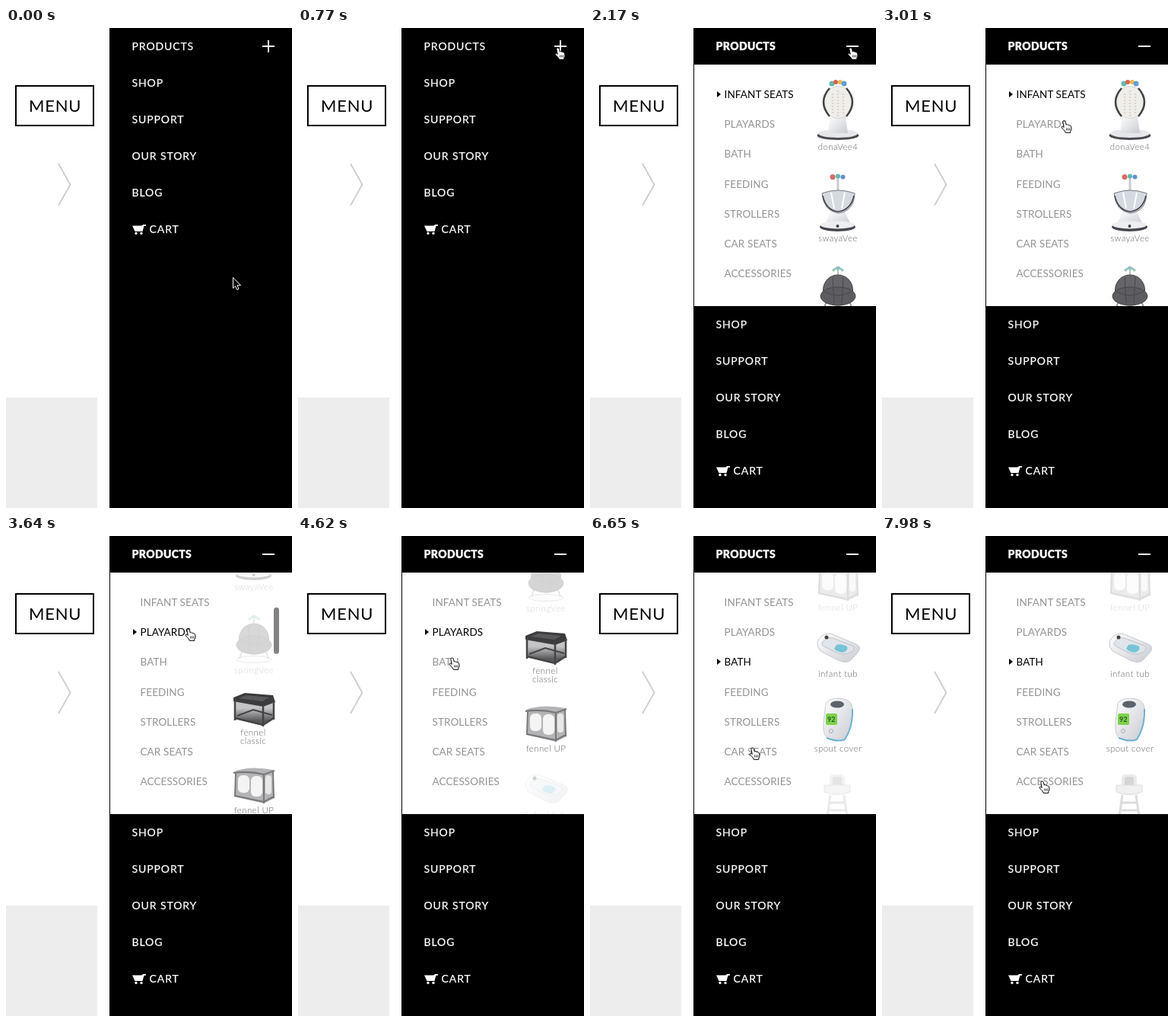
An HTML page for the animation above (8000 ms loop, 376 by 630 pixels).

```html
<!DOCTYPE html>
<html lang="en">
<head>
<meta charset="utf-8">
<title>Mobile shop menu</title>
<style>
  html, body { margin: 0; width: 100%; height: 100%; overflow: hidden; background: #fff; }
  svg { display: block; width: 376px; height: 630px; font-family: Lato, sans-serif; }
  .nav { font-size: 14px; letter-spacing: .9px; fill: #fff; }
  .nav text { stroke: #fff; stroke-width: .25px; }
  .nav .open { font-weight: 900; letter-spacing: .35px; }
  .sub { font-size: 13.5px; letter-spacing: .1px; fill: #949494; }
  .sub .on { fill: #000; }
  .label { font-size: 11.5px; font-weight: 300; letter-spacing: .4px; fill: #666; text-anchor: middle; }
  .line { fill: none; stroke: #444; }
</style>
</head>
<body>
<svg viewBox="0 0 376 630">
  <defs>
    <clipPath id="window"><rect id="clip" x="137" y="48" width="239" height="0"/></clipPath>
    <linearGradient id="shell" x2="1" y2="1">
      <stop offset="0" stop-color="#fff"/><stop offset="1" stop-color="#c9ccd2"/>
    </linearGradient>
    <linearGradient id="mesh" x2="0" y2="1">
      <stop offset=".3" stop-color="#c4c4c6"/><stop offset=".8" stop-color="#59595c"/>
    </linearGradient>
  </defs>

  <rect width="376" height="630" fill="#fff"/>
  <rect y="485" width="120" height="145" fill="#ededed"/>
  <rect x="13" y="76" width="102" height="52" fill="none" stroke="#000" stroke-width="2"/>
  <text x="30" y="110" font-size="22" letter-spacing=".8">MENU</text>
  <path d="M69 178L84.5 205.5 69 233" fill="none" stroke="#ccc" stroke-width="1.8"/>
  <rect x="136" width="240" height="630"/>

  <g class="nav">
    <text id="products" x="165.5" y="29">PRODUCTS</text>
    <path d="M337 24H353" stroke="#fff" stroke-width="2"/>
    <path id="plus" d="M345 16V32" stroke="#fff" stroke-width="2"/>
    <g id="links">
      <path d="M166 259.500H178L180.5 258H184V259.800H181.500L179.500 267H169.500Z"/>
      <circle cx="171" cy="269.5" r="1.7"/><circle cx="178" cy="269.5" r="1.7"/>
      <text x="188.5" y="269">CART</text>
    </g>
  </g>

  <g clip-path="url(#window)">
    <rect x="137" y="48" width="239" height="320" fill="#fff"/>
    <g id="sub" class="sub"></g>
    <path id="marker" d="M167 83L172 87 167 91Z"/>

    <g id="list">
      <g class="group">
        <!-- tall swing seat -->
        <ellipse cx="326" cy="141" rx="27.5" ry="6" fill="#4a4a52"/>
        <ellipse cx="326" cy="138.5" rx="26" ry="5.5" fill="#e6e7eb"/>
        <path d="M316 116H336L339 138H313Z" fill="url(#shell)"/>
        <ellipse cx="326" cy="97.5" rx="19.5" ry="21" fill="#f0eeea" stroke="#d8d5d0"/>
        <path d="M315 79Q299 97 315 116M337 79Q353 97 337 116" class="line" stroke-width="2.5"/>
        <path d="M319 86V112M333 86V112M326 82V118" fill="none" stroke="#dcd6cc" stroke-width="2.5" stroke-dasharray="2 2"/>
        <path d="M316 74Q326 67 336 74" fill="none" stroke="#ccc" stroke-width="2"/>
        <circle cx="318" cy="73" r="3.5" fill="#62b9ae"/><circle cx="323" cy="71" r="3" fill="#dc604e"/>
        <circle cx="329" cy="71" r="3" fill="#e9bd54"/><circle cx="334" cy="73" r="3.5" fill="#649ed0"/>
        <text class="label" x="326" y="160">donaVee4</text>

        <!-- rocking seat -->
        <path d="M326 197V218" stroke="#c8cad0" stroke-width="3"/>
        <circle cx="319" cy="195.5" r="3.5" fill="#d76b65"/><circle cx="326" cy="194.5" r="3" fill="#5cb7b5"/>
        <circle cx="332.5" cy="195.5" r="3" fill="#668fc7"/>
        <path d="M316 241H335L343 258H309Z" fill="url(#shell)"/>
        <ellipse cx="325.5" cy="261" rx="23.5" ry="6" fill="#45464e"/>
        <ellipse cx="325.5" cy="258.5" rx="22.5" ry="5" fill="#eceef1"/>
        <circle cx="325.5" cy="260" r="2" fill="#444"/>
        <path d="M305 217Q326 209 348 217 347 241 326 243 307 240 305 217Z" fill="#d5d9e2" stroke="#767b87"/>
        <path d="M306 220Q310 239 326 241 343 239 347 220" class="line" stroke-width="1.5"/>
        <path d="M317 216L321 237M335 216L331 237" stroke="#fff" stroke-width="2"/>
        <text class="label" x="326" y="280">swayaVee</text>

        <!-- bouncer -->
        <path d="M326 317V328" stroke="#bbb" stroke-width="2"/>
        <path d="M319 319Q326 311 333 319" fill="none" stroke="#9bc7bd" stroke-width="3"/>
        <circle cx="326" cy="315" r="2.5" fill="#8fbfc6"/>
        <ellipse cx="326" cy="371" rx="23" ry="4.500" fill="#f4f4f4" stroke="#aaa"/>
        <path d="M311 358L307 370M341 358L345 370" stroke="#999" stroke-width="2"/>
        <ellipse cx="326" cy="344" rx="19.5" ry="20" fill="#66666a" stroke="#444"/>
        <ellipse cx="326" cy="352" rx="23" ry="12" fill="#5d5d61" stroke="#444"/>
        <path d="M308 346Q326 356 344 346M319 327L321 362M333 327L331 362" fill="none" stroke="#48484c"/>
        <text class="label" x="326" y="388.5">springVee</text>
      </g>

      <g class="group">
        <!-- dark playard -->
        <path d="M302 425L338 433 352 426V449L338 458 302 449Z" fill="url(#mesh)"/>
        <path d="M304 445L325 437 350 444" class="line" stroke-width="2"/>
        <path d="M299 421L314 415 351 418 354 427 338 433 299 426Z" fill="#3c3c3f"/>
        <path d="M306 422L316 418 346 421 337 426Z" fill="#59595c"/>
        <path d="M301 424V451M338 432V459M352 425V450M301 448L338 457 352 448" class="line" stroke-width="2.5"/>
        <text class="label" x="325" y="470.5">fennel</text>
        <text class="label" x="325" y="481.5">classic</text>

        <!-- light playard -->
        <path d="M300 518Q320 510 352 516L350 524 353 553 339 560 300 551 303 525Z" fill="#b4b4b6"/>
        <rect x="305" y="523" width="15" height="23" rx="6" fill="#f4f4f5"/>
        <rect x="322" y="524" width="15" height="27" rx="6" fill="#f4f4f5"/>
        <rect x="341" y="523" width="8" height="25" rx="4" fill="#e8e8ea"/>
        <path d="M299 520Q320 517 339 522L353 517M302 521L301 551M339 522V560M351 518L352 553M301 550L339 558 352 551" fill="none" stroke="#77777a" stroke-width="2"/>
        <text class="label" x="326" y="573">fennel UP</text>
      </g>

      <g class="group">
        <!-- tub -->
        <path d="M299 614Q303 603 316 603L350 617Q357 620 353 627L343 638Q337 643 326 638L303 626Q298 621 299 614Z" fill="url(#shell)" stroke="#c7cacf"/>
        <path d="M306 614Q311 607 319 609L345 619Q350 622 344 627 333 633 322 627L308 620Q303 617 306 614Z" fill="#dfe5e9" stroke="#bdc3c9"/>
        <path d="M324 618Q331 616 338 620 340 626 332 628 324 627 321 623Z" fill="#77c3d8"/>
        <circle cx="311" cy="608" r="2.5" fill="#444"/>
        <text class="label" x="326" y="660">infant tub</text>

        <!-- spout cover -->
        <path d="M310 695Q313 688 326 688 343 688 345 700 346 725 335 742 326 746 311 739 306 735 307 720Z" fill="url(#shell)" stroke="#c8ccd2"/>
        <path d="M345 702Q346 725 335 742 326 746 311 740" fill="none" stroke="#6eb2d2" stroke-width="2"/>
        <ellipse cx="325" cy="696" rx="9" ry="4.5" fill="#5b626b"/>
        <rect x="310" y="708" width="15" height="15" rx="2" fill="#7ed24d"/>
        <text x="312" y="719" font-size="9" font-weight="700" fill="#28591e">92</text>
        <circle cx="317" cy="731" r="2.5" fill="none" stroke="#aaa"/>
        <text class="label" x="326" y="758">spout cover</text>
      </g>

      <g class="group">
        <!-- high chair -->
        <rect x="315" y="788" width="20" height="18" rx="5" fill="#ccc"/>
        <rect x="319" y="791" width="12" height="14" rx="3" fill="#999"/>
        <path d="M308 802H342V811Q325 818 308 811Z" fill="#dadada" stroke="#aaa"/>
        <path d="M316 815L311 850M334 815L339 850M314 825H336M312 835H338" fill="none" stroke="#aaa" stroke-width="3"/>
      </g>
    </g>
    <rect id="thumb" x="352" width="7" height="61" rx="3.5" fill="#828282"/>
  </g>

  <path id="arrow" d="M.5 .5V14.500L3.500 11.700 5.700 16.500 8 15.500 6 10.800H10.500Z" fill="#000" stroke="#fff"/>
  <g id="hand" stroke="#000" stroke-linejoin="round">
    <path d="M4.200 1Q5.800 .6 6.300 2.200L7.300 6Q8.600 5 9.400 6.300 10.800 5.600 11.500 7 13 6.600 13.600 8.200L14 11Q14 13 12.800 14.500V16.300H6.200L5.800 15Q4 12.500 1.200 9.800 .8 8 2.600 8.200L4.200 9.400 2.800 2.600Q2.800 1.200 4.200 1Z" fill="#fff"/>
    <path d="M7.700 10.500V13.500M9.700 10.500V13.500M11.700 10.500V13.500" stroke-width=".8"/>
  </g>
</svg>

<script>
const LOOP = 8000, TICK = 70, FADED = .25;
const OPEN = 1960, PLAYARDS = 3290, BATH = 5110;
const $ = id => document.getElementById(id);
const set = (el, name, value) => el.setAttribute(name, value);
const move = (el, x, y) => set(el, 'transform', `translate(${x} ${y})`);
const clamp = v => Math.min(1, Math.max(0, v));
const span = (t, start, length) => clamp((t - start) / length);
const swing = p => (1 - Math.cos(Math.PI * p)) / 2;

function addText(parent, label, x, y) {
  const el = document.createElementNS('http://www.w3.org/2000/svg', 'text');
  set(el, 'x', x);
  set(el, 'y', y);
  el.textContent = label;
  parent.append(el);
  return el;
}

['SHOP', 'SUPPORT', 'OUR STORY', 'BLOG'].forEach((s, i) => addText($('links'), s, 165.5, 77 + 48 * i));
const categories = ['INFANT SEATS', 'PLAYARDS', 'BATH', 'FEEDING', 'STROLLERS', 'CAR SEATS', 'ACCESSORIES']
  .map((s, i) => addText($('sub'), s, 176.5, 92 + Math.round(39.2 * i)));
const groups = [...document.querySelectorAll('.group')];

// time, x, y of the pointer's hot spot
const path = [
  [0, 298, 327], [70, 338, 217], [210, 338, 217], [770, 341, 26], [1610, 341, 26],
  [1680, 342, 26], [2380, 342, 26], [3010, 239, 122], [4060, 239, 122],
  [4480, 212, 153], [4550, 212, 153], [4620, 202, 160], [4970, 201, 163],
  [5740, 201, 163], [6580, 213, 275], [6860, 214, 298], [6930, 214, 298],
  [7140, 215, 288], [7630, 215, 288], [7980, 210, 322]
];

function pointerAt(t) {
  const i = Math.max(1, path.findIndex(k => k[0] >= t));
  const [t0, x0, y0] = path[i - 1], [t1, x1, y1] = path[i];
  const p = swing(span(t, t0, t1 - t0));
  return [x0 + (x1 - x0) * p, y0 + (y1 - y0) * p];
}

function groupOpacity(i, t) {
  const start = [0, PLAYARDS, BATH, LOOP][i] - TICK;
  const end = [PLAYARDS, BATH, LOOP, LOOP][i] - TICK;
  const fadeIn = i ? span(t, start, 250) : 1;
  const fadeOut = i < 2 ? span(t, end, 250) : 0;
  return FADED + (1 - FADED) * (fadeIn - fadeOut);
}

function thumbOpacity(t) {
  if (t < PLAYARDS) return 0;
  return t < BATH ? 1 - span(t, 4060, 490) : 1 - span(t, 5740, 490);
}

function render(t) {
  const isOpen = t >= OPEN;
  const height = isOpen ? Math.round(317 * swing(span(t, 1708, 400))) : 0;
  set($('clip'), 'height', height);
  move($('links'), 0, height);
  $('products').classList.toggle('open', isOpen);
  set($('plus'), 'opacity', isOpen ? 0 : 1);

  const active = t < PLAYARDS ? 0 : t < BATH ? 1 : 2;
  categories.forEach((el, i) => el.classList.toggle('on', i === active));
  move($('marker'), 0, Math.round(39.2 * active));

  const scroll = Math.round(290 * swing(span(t, 3220, 650)) + 185 * swing(span(t, 5050, 470)));
  move($('list'), 0, -scroll);
  groups.forEach((el, i) => set(el, 'opacity', groupOpacity(i, t)));
  set($('thumb'), 'y', 50 + .2094 * scroll);
  set($('thumb'), 'opacity', thumbOpacity(t));

  const [x, y] = pointerAt(t).map(Math.round);
  const isHand = t >= 770;
  move($('arrow'), x, y);
  move($('hand'), x - 4, y - 1);
  set($('arrow'), 'opacity', isHand ? 0 : 1);
  set($('hand'), 'opacity', isHand ? 1 : 0);
}

const begin = performance.now();
function frame() {
  const t = (performance.now() - begin) % LOOP;
  render(Math.floor(t / TICK) * TICK);
  requestAnimationFrame(frame);
}
frame();
</script>
</body>
</html>
```
